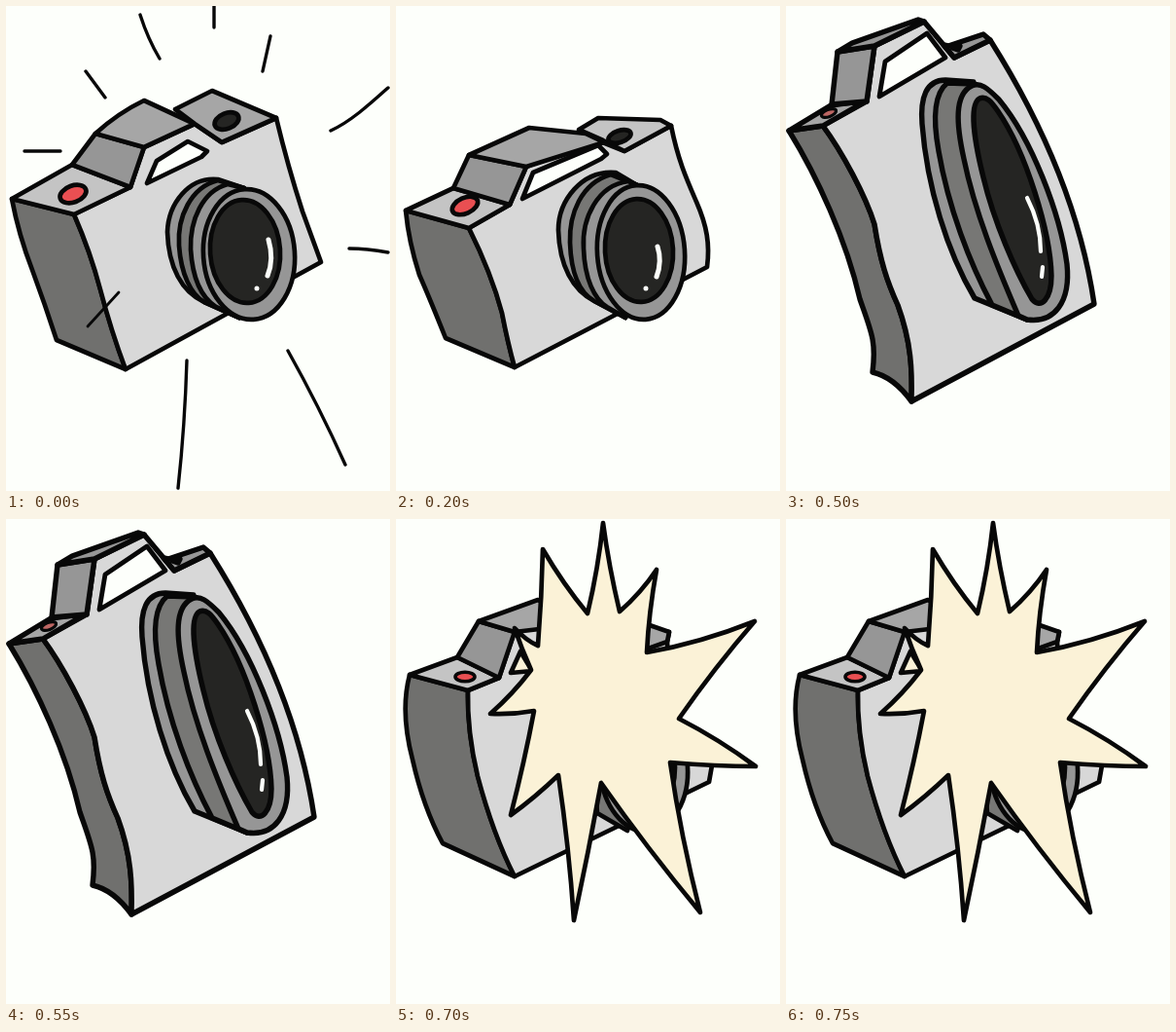
Animation, 395 px wide and 498 px high, one loop 800 ms. Source, as an HTML page:

```html
<!DOCTYPE html>
<html lang="en">
<head>
<meta charset="utf-8">
<title>Camera flash</title>
<style>
  html, body { margin: 0; width: 100%; height: 100%; overflow: hidden; background: #fdfffb; }
  svg { display: block; width: 100%; height: 100%; }
  .pose { opacity: 0; fill: none; stroke: #080808; stroke-width: 4.7; stroke-linecap: round; stroke-linejoin: round; }
  .stretched { stroke-width: 5.4; }
  .front { fill: #d8d8d8; }
  .plate { fill: #c4c4c4; }
  .side { fill: #70706e; }
  .mid { fill: #969696; }
  .top { fill: #a6a6a6; }
  .barrel { fill: #777775; }
  .glass { fill: #252523; }
  .red { fill: #e94f52; }
  .stretched .red { fill: #bd6663; }
  .white { fill: #fdfffb; }
  .shine { stroke: #fdfffb; }
  .rays { stroke-width: 3.4; }
  .burst { fill: #fbf2d7; }
</style>
</head>
<body>
<svg viewBox="0 0 395 498">
  <!-- camera with rays -->
  <g class="pose">
    <path class="side" d="M6 198L70 214Q87 253 97 291Q108 333 123 373L52 343Q40 306 27 271Q13 235 6 198Z"/>
    <path class="front" d="M70 214L128 186L142 145L194 121L222 140L278 115Q290 165 305 211L324 263L123 373Q108 333 97 291Q87 253 70 214Z"/>
    <path class="plate" d="M6 198L68 163L128 186L70 214Z"/>
    <path class="mid" d="M68 163L92 131L142 145L128 186Z"/>
    <path class="top" d="M92 131Q115 110 142 97L194 121L142 145Z"/>
    <path class="top" d="M174 106L212 87L278 115L222 140L194 121Z"/>
    <ellipse class="red" cx="69" cy="193" rx="14" ry="8.5" transform="rotate(-20 69 193)"/>
    <ellipse class="glass" cx="227" cy="118" rx="13" ry="8" transform="rotate(-22 227 118)"/>
    <path class="white" d="M145 182L155 159L187 139L207 149L201 155Z"/>
    <path class="mid" d="M245 187L218 178C188 175 167 203 166 232C167 268 181 294 204 304L240 320Z"/>
    <path class="barrel" d="M245 187L218 179C190 186 176 217 178 246C180 275 190 296 204 304L240 320Z"/>
    <path class="mid" d="M245 187L228 183C202 190 189 220 190 250C192 282 202 300 216 309L240 320Z"/>
    <ellipse class="mid" cx="250" cy="255" rx="47" ry="67" transform="rotate(-4 250 255)"/>
    <ellipse class="glass" cx="246" cy="252" rx="36" ry="53" transform="rotate(-4 246 252)"/>
    <path class="shine" d="M270 240Q276 260 269 277M258 290v.1" stroke-width="5"/>
    <path d="M116 294L84 329" stroke-width="2.8"/>
    <path class="rays" d="M138 9Q146 34 158 54M214 0V22M272 31L264 67M82 67L102 94M19 149H56M393 84C374 101 354 119 334 128M353 249Q371 249 393 253M186 364Q184 431 177 495M290 354Q322 411 349 471"/>
  </g>

  <!-- camera at rest -->
  <g class="pose">
    <path class="side" d="M10 210L75 228Q98 274 109 315Q115 346 122 371L51 341Q35 301 24 276Q13 242 10 210Z"/>
    <path class="front" d="M75 228L117 204L134 165L205 137L235 149L283 123C290 158 299 178 309 201C320 226 323 245 320 268L122 371Q115 346 109 315Q98 274 75 228Z"/>
    <path class="plate" d="M10 210L59 187L117 204L75 228Z"/>
    <path class="mid" d="M59 187L75 153L134 165L117 204Z"/>
    <path class="top" d="M75 153L137 125L195 131L214 140L134 165Z"/>
    <path class="plate" d="M188 127L208 115L272 117L283 123L235 149L213 138Z"/>
    <ellipse class="red" cx="71" cy="205" rx="14" ry="8" transform="rotate(-24 71 205)"/>
    <ellipse class="glass" cx="230" cy="134" rx="12" ry="6" transform="rotate(-18 230 134)"/>
    <path class="white" d="M130 198L141 171L208 143L217 152L211 157Z"/>
    <path class="mid" d="M248 184L226 171C191 168 167 200 167 230C168 267 182 292 204 303L236 320Z"/>
    <path class="barrel" d="M248 184L221 173C190 182 178 214 179 243C180 272 188 294 204 303L236 320Z"/>
    <path class="mid" d="M248 184L239 180C207 184 191 218 193 249C194 280 204 301 217 309L236 320Z"/>
    <ellipse class="mid" cx="252" cy="253" rx="45" ry="69" transform="rotate(-4 252 253)"/>
    <ellipse class="glass" cx="250" cy="251" rx="35" ry="53" transform="rotate(-3 250 251)"/>
    <path class="shine" d="M269 247Q274 262 268 278M257 290v.1" stroke-width="5"/>
  </g>

  <!-- stretched camera -->
  <g class="pose stretched">
    <path class="side" d="M3 128L38 123C58 150 82 195 91 224C97 262 104 283 115 307C129 345 130 375 129 406Q111 381 89 376C93 345 88 335 76 301C62 240 32 175 3 128Z"/>
    <path class="front" d="M38 123L83 98L91 41L142 16L173 53L210 35C248 95 300 190 317 306L129 406C130 375 129 345 115 307C104 283 97 262 91 224C82 195 58 150 38 123Z"/>
    <path class="top" d="M3 128L46 102L83 97L38 123Z"/>
    <path class="mid" d="M53 47L91 41L83 98L47 101Z"/>
    <path class="mid" d="M53 47L68 38L136 14L142 16L91 41Z"/>
    <path class="mid" d="M167 41L203 29L210 35L173 53L162 40Z"/>
    <path class="glass" d="M171 43L179 41L177 45Z"/>
    <ellipse class="red" cx="44" cy="110" rx="8" ry="3.6" transform="rotate(-20 44 110)" stroke-width="3.2"/>
    <path class="white" d="M96 93L102 57L145 28L164 53Z" stroke-width="4.8"/>
    <path class="mid" d="M193 78L164 76C144 76 138 94 140 121C145 186 166 253 194 300L248 322Z"/>
    <path class="barrel" d="M193 80L166 79C152 90 151 116 157 149C167 207 189 264 212 307L248 322Z"/>
    <path class="mid" d="M191 82C173 91 175 121 183 157C194 211 217 267 239 318L248 322C276 326 293 304 289 265C282 213 253 137 219 96C207 84 200 78 191 82Z"/>
    <path class="glass" d="M199 95C188 101 194 140 203 176C214 222 236 272 253 301C262 312 273 301 273 277C272 232 247 150 218 108C211 98 206 92 199 95Z"/>
    <path class="shine" d="M248 197Q262 224 262 252M264 268L263 278" stroke-width="4.2"/>
  </g>

  <!-- flash -->
  <g class="pose">
    <path class="side" d="M14 160L74 176Q73 218 84 264Q100 324 122 367L48 333Q28 296 17 247Q4 198 14 160Z"/>
    <path class="front" d="M74 176L106 163L122 115L210 105L281 116L279 126L283 205L325 253L322 270L122 367Q100 324 84 264Q73 218 74 176Z"/>
    <path class="plate" d="M14 160L63 142L106 163L74 176Z"/>
    <path class="mid" d="M63 142L85 105L122 116L106 163Z"/>
    <path class="top" d="M85 105L146 83L190 108L122 116Z"/>
    <path class="top" d="M210 110L258 108L281 116L279 126L240 140Z"/>
    <ellipse class="red" cx="71" cy="162" rx="10" ry="4.8" stroke-width="3.6"/>
    <path class="burst" d="M118 158L128 136L140 156Z"/>
    <path class="barrel" d="M203 255L207 302L238 320L260 240Z"/>
    <ellipse class="mid" cx="255" cy="256" rx="45" ry="65" transform="rotate(-4 255 256)"/>
    <ellipse class="glass" cx="252" cy="255" rx="35" ry="53"/>
    <path class="burst" d="M213 4Q219 49 230 95Q252 76 268 52Q260 96 258 137Q314 127 369 105Q328 152 291 205Q332 226 370 254Q329 254 282 250Q293 326 313 404Q258 338 211 271Q198 342 183 412Q178 337 167 263Q143 286 118 304Q132 250 142 197Q120 201 97 200Q120 180 139 155Q129 133 122 112Q134 125 146 130Q150 80 151 31Q172 67 197 97Q208 51 213 4Z"/>
  </g>
</svg>
<script>
  const LOOP = 800;
  const starts = [0, 200, 500, 650, LOOP];

  document.querySelectorAll('.pose').forEach((pose, i) => {
    const from = starts[i] / LOOP, to = starts[i + 1] / LOOP;
    const frames = [
      { opacity: 0, offset: 0 },
      { opacity: 1, offset: from },
      { opacity: 0, offset: to },
      { opacity: 0, offset: 1 }
    ].map(frame => ({ ...frame, easing: 'steps(1, end)' }));
    const animation = pose.animate(frames, { duration: LOOP, iterations: Infinity });
    animation.startTime = 0;
  });
</script>
</body>
</html>
```
